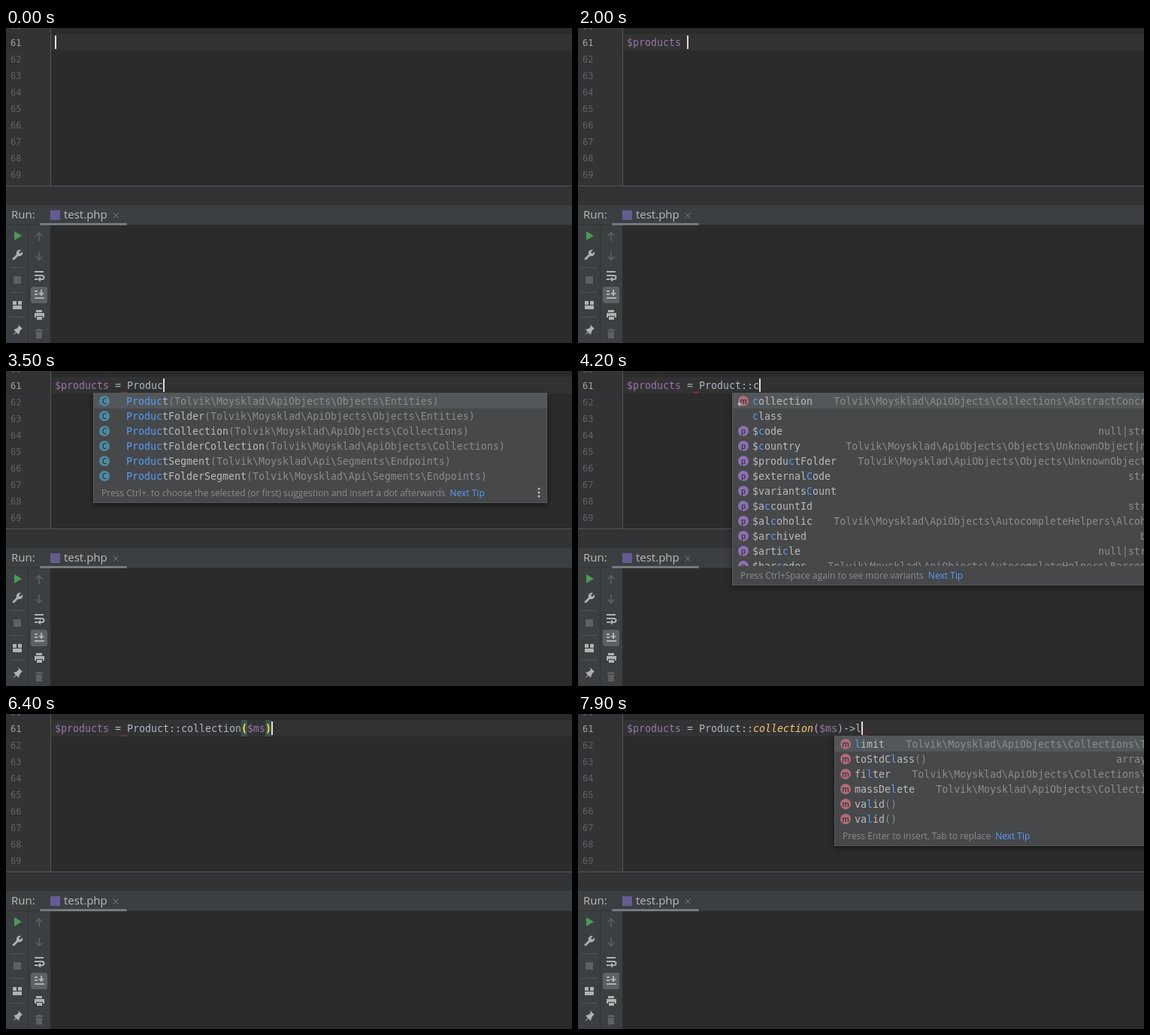
An HTML page for the animation above (8 s loop, 753 by 420 pixels).

```html
<!DOCTYPE html>
<html lang="en">
<head>
<meta charset="utf-8">
<title>Code completion</title>
<style>
html, body { margin: 0; width: 100%; height: 100%; overflow: hidden; background: #2b2b2b; }
svg { display: block; }
text { font: 15px "Open Sans", "Noto Sans", sans-serif; fill: #bbb; white-space: pre; }
.mono { font: 13.29px "DejaVu Sans Mono", "Noto Sans Mono", monospace; }
.num { font-size: 12px; fill: #606366; }
.code { fill: #a9b7c6; }
.var { fill: #9876aa; }
.call { fill: #ffc66d; font-style: italic; }
.lit { fill: #ffef28; font-weight: bold; }
.dim { fill: #8c8c8c; }
.hit { fill: #589df6; }
.old { text-decoration: line-through; }
.tip { font-size: 12px; fill: #8c8c8c; }
.badge { font-size: 10px; font-weight: 600; fill: #333; text-anchor: middle; }
.right { text-anchor: end; }
.popup { filter: drop-shadow(0 3px 4px #0007); }
.on { fill: #afb1b3; }
.off { fill: #5e6163; }
.line { fill: none; stroke: #afb1b3; stroke-width: 2; }
.thin { fill: none; stroke: #5e6163; stroke-width: 1.6; }
</style>
</head>
<body>
<svg width="753" height="420" viewBox="0 0 753 420">
  <path fill="#2b2b2b" d="M0 0h753v420H0z"/>
  <path fill="#313335" d="M0 0h59v210H0zM0 211h753v25H0z"/>
  <path fill="#323232" d="M0 8h753v22H0z"/>
  <path fill="#555" d="M59 0h1v210h-1zM0 210h753v1H0z"/>
  <g id="numbers"></g>

  <path fill="#3c3f41" d="M0 236h753v26H0zM0 262h59v158H0z"/>
  <path fill="#323232" d="M0 262h753v1H0zM29 263h1v157h-1z"/>
  <text x="7" y="254">Run:</text>
  <rect x="59" y="243" width="13" height="13" fill="#655b91"/>
  <text x="77" y="254">test.php</text>
  <path d="M142.500 246.500l7 7m0-7l-7 7" stroke="#777b7e"/>
  <rect x="45" y="260" width="116" height="3" rx="1.500" fill="#747a80"/>

  <path fill="#499c54" d="M11 271l10 6-10 6z"/>
  <path class="on" d="M9 307l5-5c-1-4 2-7 6-6l-3 3 2 2 3-3c1 4-2 7-6 6l-5 5c-2 1-3-1-2-2z"/>
  <path fill="#515456" d="M5 319h20v1H5zM5 352h20v1H5zM5 385h20v1H5z"/>
  <path class="off" d="M10 331h10v10H10z"/>
  <path class="on" d="M9 364h5v5H9zM16 364h5v5h-5zM9 370h12v5H9z"/>
  <path class="on" d="M16 395l6 6-2 1-2 3-1 4-3-3-5 4 4-5-3-3 4-1 3-3z"/>

  <path class="thin" d="M44 284v-11m-4.500 4.500l4.500-4.500 4.500 4.500M44 298v11m-4.500-4.500l4.500 4.500 4.500-4.500"/>
  <path class="line" d="M38 325h12M38 330h9.500c4 0 4 5 0 5h-3M38 335h4"/>
  <path class="on" d="M46 331.500v7l-4-3.500z"/>
  <rect x="33" y="345" width="22" height="22" rx="3" fill="#5c6164"/>
  <path class="line" d="M38 351h4M38 355h4M38 360h13M47 349v6"/>
  <path class="on" d="M43 353h8l-4 4.500z"/>
  <path class="on" d="M40 376h8v3h-8zM38 380h13v6h-2v-2h-9v2h-2zM41 385h7v4h-7z"/>
  <path class="off" d="M39 402h3v-1h4v1h3v2H39zM40 405h8v9h-8z"/>
  <g id="live"></g>
</svg>
<script>
const LOOP = 8000, LEFT = 65, CELL = 8, ROW = 20, TOP = 30;
const live = document.getElementById('live');

// One row per line: icon; name; type
const parse = text => text.trim().split('\n').map(line => line.split(';'));

const globals = parse(String.raw`
v;ms;Tolvik\Moysklad\MoySklad
v;_ENV;array
v;php_errormsg;string
v;_COOKIE;array
v;_FILES;array
v;_GET;array
v;_POST;array
v;_REQUEST;array
v;_SERVER;array
v;_SESSION;array
v;argc;int
v;argv;array
v;http_response_header;array`);

const locals = [...globals];
locals.splice(1, 0, ['v', 'products', String.raw`Tolvik\Moysklad\ApiObjects\Collections\AbstractConcreteC…`]);

const spaces = parse(String.raw`
f;Params(Tolvik\Moysklad\Api\Traits\Params)
f;Params(Tolvik\Tests\Unit\Api\Traits\Params)
f;Pcre(Composer\Pcre)
f;Pcre(_PHPStan_cbfb23d84\Composer\Pcre)
f;PgSql
f;Parser(PhpParser\Parser)
f;PhpCsFixer
f;Phpdoc(PhpCsFixer\Fixer\Phpdoc)
f;PhpGenerator(_PHPStan_cbfb23d84\Nette\PhpGenerator)
f;PhpParser
f;PHPStan
f;PhpStorm(JetBrains\PhpStorm)`);

const classes = parse(String.raw`
c;Product(Tolvik\Moysklad\ApiObjects\Objects\Entities)
c;ProductFolder(Tolvik\Moysklad\ApiObjects\Objects\Entities)
c;ProductCollection(Tolvik\Moysklad\ApiObjects\Collections)
c;ProductFolderCollection(Tolvik\Moysklad\ApiObjects\Collections)
c;ProductSegment(Tolvik\Moysklad\Api\Segments\Endpoints)
c;ProductFolderSegment(Tolvik\Moysklad\Api\Segments\Endpoints)
c;Process(Symfony\Component\Process)
c;ProcessHelper(Symfony\Component\Console\Helper)
c;ProgressBar(Symfony\Component\Console\Helper)
c;Property(PhpParser\Node\Stmt)
c;PrettyPrinter(PhpParser)
c;PropertyFetch(PhpParser\Node\Expr)`);

const statics = parse(String.raw`
s;collection;Tolvik\Moysklad\ApiObjects\Collections\AbstractConcrete
-;class;
p;$code;null|string
p;$country;Tolvik\Moysklad\ApiObjects\Objects\UnknownObject|null
p;$productFolder;Tolvik\Moysklad\ApiObjects\Objects\UnknownObject|n…
p;$externalCode;string
p;$variantsCount;
p;$accountId;string
p;$alcoholic;Tolvik\Moysklad\ApiObjects\AutocompleteHelpers\Alcohol…
p;$archived;bool
p;$article;null|string
p;$barcodes;Tolvik\Moysklad\ApiObjects\AutocompleteHelpers\Barcodes…`);

const filtered = parse(String.raw`
m;limit;Tolvik\Moysklad\ApiObjects\Collections\Traits
m;toStdClass();array|null
m;filter;Tolvik\Moysklad\ApiObjects\Collections\Trait
m;massDelete;Tolvik\Moysklad\ApiObjects\Collections\T
m;valid();
m;valid();`);

const members = [...filtered.slice(0, 5), ...parse(String.raw`
m;get;Tolvik\Moysklad\ApiObjects\Collections\Traits
m;each;Tolvik\Moysklad\ApiObjects\Collections\Traits
m;offset;Tolvik\Moysklad\ApiObjects\Collections\Traits
m;order;Tolvik\Moysklad\ApiObjects\Collections\Traits
m;search;Tolvik\Moysklad\ApiObjects\Collections\Traits
m;count();
m;current();`)];

const tips = {
  move: 'Ctrl+Down and Ctrl+Up will move caret down and up in the editor',
  dot: 'Press Ctrl+. to choose the selected (or first) suggestion and insert a dot afterwards',
  more: 'Press Ctrl+Space again to see more variants',
  insert: 'Press Enter to insert, Tab to replace'
};

const popup = (x, end, list, key, tip, indent = 27) => ({ x, end, list, key, tip, indent });
const only = (list, key) => list.filter(row => row[1].includes(key));
const first = key => popup(45, 632, only(globals, key), key, tips.move);
const argument = key => popup(301, 888, only(locals, key), key, tips.move);
const classNames = key => popup(116, 720, only(classes, key), key, tips.dot, 44);
const staticNames = key => popup(205, 792, statics, key, tips.more);
const memberNames = (list, key) => popup(341, 808, list, key, tips.insert);

// Start time, code with | as caret, column of the error wave, popup
const set = '$products = ', call = set + 'Product::collection(';
const steps = [
  [0, '|'], [400, '$|'], [500, '$|', 0, first('')], [800, '$p|', 0, first('p')],
  [900, '$pr|'], [1100, '$pro|'], [1300, '$prod|'], [1400, '$produ|'], [1500, '$produc|'],
  [1800, '$product|'], [2000, '$products |'], [2200, '$products =|'], [2300, set + '|'],
  [2600, set + '|', 11], [2800, set + 'P|', 11], [2900, set + 'P|', 11, popup(133, 720, spaces, 'P', tips.dot)],
  ...['Pr', 'Pro', 'Prod', 'Produ', 'Produc', 'Product'].map((key, i) =>
    [3100 + i * 100, set + key + '|', 11, classNames(key)]),
  [4000, set + 'Product:|', 11],
  [4100, set + 'Product::|', 11, staticNames('')],
  [4200, set + 'Product::c|', 11, staticNames('c')],
  [4600, call + '|)', 11],
  [4800, call + '$|)', 11, argument('')],
  [5500, call + '$)', 11, argument('')],
  [5700, call + '$m|)', 11, argument('m')],
  [5800, call + '$ms|)', 11, argument('ms')],
  [6400, call + '$ms)|', 11],
  [6700, call + '$ms)-|', 11],
  [6800, call + '$ms)-|', 37],
  [7100, call + '$ms)->|', 38],
  [7200, call + '$ms)->|', 38, memberNames(members, '')],
  [7900, call + '$ms)->l|', 39, memberNames(filtered, 'l')]
];

const span = (cls, text) => `<tspan class="${cls}">${text}</tspan>`;
const rect = (x, y, w, h, fill) => `<rect x="${x}" y="${y}" width="${w}" height="${h}" fill="${fill}"/>`;
const mono = (x, y, cls, text) => `<text class="mono ${cls}" x="${x}" y="${y}">${text}</text>`;

function drawCode(source, wave = 0) {
  const caret = source.indexOf('|'), code = source.replace('|', '');
  const open = code.indexOf('('), close = code.indexOf(')');
  const lit = close >= 0 && caret <= close + 1;
  const at = col => LEFT + col * CELL;
  const painted = code.replace(/\$\w*|collection|[()]/g, part =>
    part[0] === '$' ? span('var', part)
      : part === 'collection' ? span(wave > 11 ? 'call' : '', part)
      : span(lit ? 'lit' : '', part));
  let out = '';
  if (lit) out += [open, close].map(col => rect(at(col), 8, CELL, 22, '#3b514d')).join('');
  out += mono(LEFT, 24, 'code', painted);
  if (wave) out += `<path d="M${at(wave)} 27.500l2 2 2-2 2 2 2-2" fill="none" stroke="#bc3f3c"/>`;
  if (caret >= 0) out += rect(at(caret), 10, 2, 18, '#ddd');
  return out;
}

const badges = {
  v: ['#b4883e', '$'], m: ['#b06c78', 'm'], s: ['#b06c78', 'm'],
  p: ['#8a72b4', 'p'], c: ['#4d8aa3', 'C']
};

function drawIcon(kind, x, y) {
  if (kind === 'f') return `<path fill="#9aa7b0" d="M${x - 7} ${y - 6}h5l2 2h7v10h-14z"/>
    <circle cx="${x}" cy="${y + 1}" r="2" fill="#46484a"/>`;
  if (!badges[kind]) return '';
  const [fill, letter] = badges[kind];
  const gem = kind === 's' ? `<path fill="#afb1b3" d="M${x - 5} ${y + 1}l3 3-3 3-3-3z"/>` : '';
  return `<circle cx="${x}" cy="${y}" r="7" fill="${fill}"/>
    <text class="badge" x="${x}" y="${y + 3.5}">${letter}</text>${gem}`;
}

function mark(name, key) {
  const i = name.toLowerCase().indexOf(key.toLowerCase());
  if (!key || i < 0) return name;
  const stop = i + key.length;
  return name.slice(0, i) + span('hit', name.slice(i, stop)) + name.slice(stop);
}

function drawPopup({ x, end, list, key, tip, indent }) {
  const w = end - x, foot = TOP + Math.min(list.length, 11.5) * ROW;
  const rows = list.slice(0, 12).map(([icon, label, type = ''], i) => {
    const y = TOP + ROW * i + 10, [, name, rest] = label.match(/^([^(]*)(.*)$/);
    return drawIcon(icon, x + 15, y)
      + mono(x + indent, y + 4.5, name === 'php_errormsg' ? 'old' : '', mark(name, key) + span('dim', rest))
      + mono(end - 12, y + 4.5, 'dim right', type);
  }).join('');
  const bar = list.length > 11 ? rect(end - 10, 31, 8, 26, '#6a6c6d') : '';
  const dots = [-5, 0, 5].map(d => `<circle cx="${end - 11}" cy="${foot + 12 + d}" r="1.500" fill="#bbb"/>`).join('');
  return `<g class="popup"><rect x="${x + 0.5}" y="29.500" width="${w - 1}" height="${foot - 4}" fill="#46484a" stroke="#56595b"/></g>`
    + rect(x + 1, TOP, w - 2, ROW, '#525759') + rows + bar
    + rect(x + 1, foot, w - 2, 25, '#46484a')
    + `<text class="tip" x="${x + 11}" y="${foot + 17}">${tip}<tspan class="hit" dx="6">Next Tip</tspan></text>${dots}`;
}

document.getElementById('numbers').innerHTML = Array.from({ length: 10 }, (_, i) =>
  `<text class="mono num" x="6" y="${2 + i * 22}"${i === 1 ? ' style="fill:#a4a3a3"' : ''}>${60 + i}</text>`).join('');

const start = performance.now();
let shown;
function tick() {
  const t = Math.max(0, performance.now() - start) % LOOP;
  const step = steps.findLast(s => s[0] <= t);
  if (step !== shown) {
    shown = step;
    const [, code, wave, list] = step;
    live.innerHTML = drawCode(code, wave) + (list ? drawPopup(list) : '');
  }
  requestAnimationFrame(tick);
}
tick();
</script>
</body>
</html>
```
